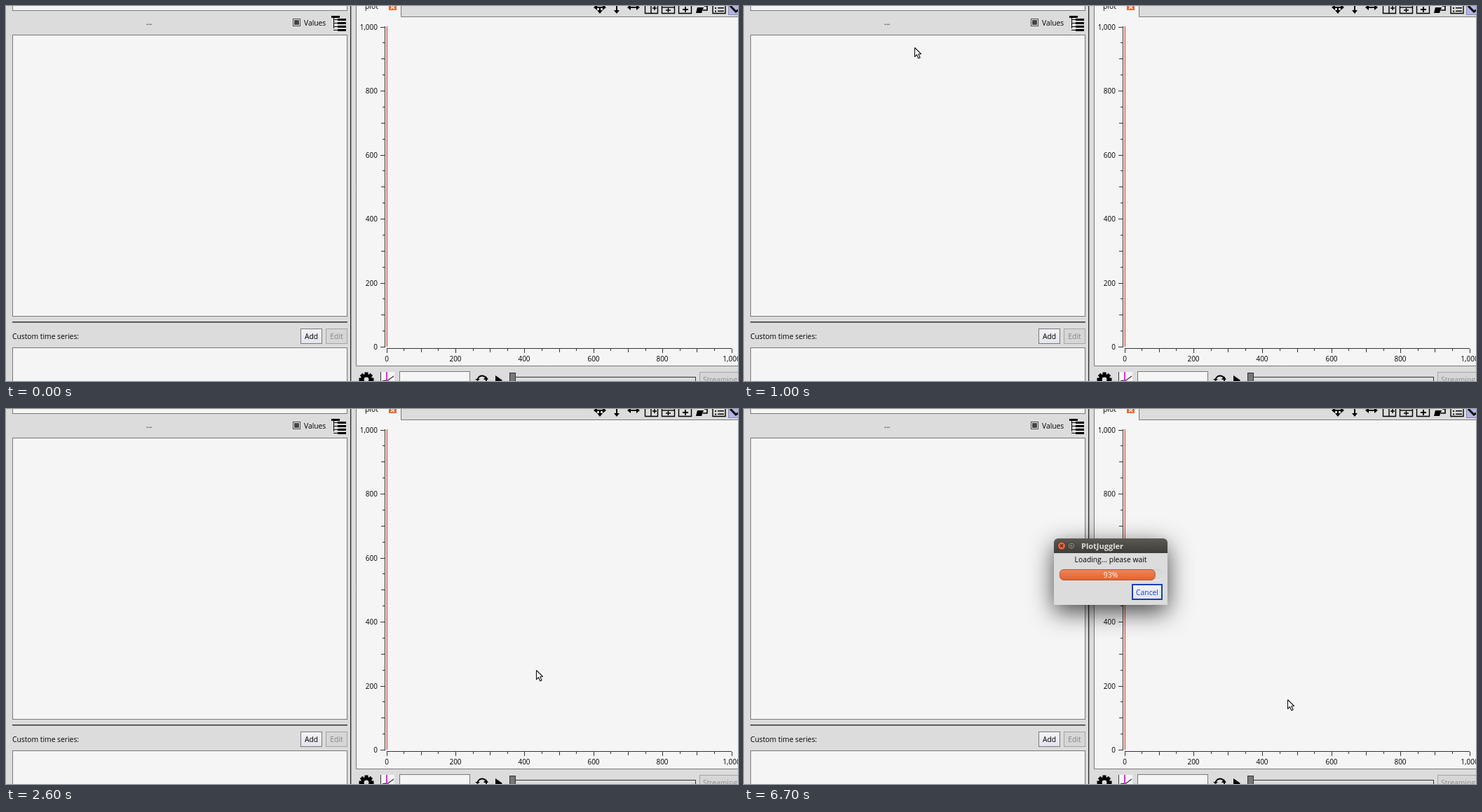
Write an HTML page with a canvas that moves like this. It is 1044 by 536 pixels and loops after 8 s.

```html
<!DOCTYPE html>
<html lang="en">
<head>
<meta charset="utf-8">
<title>Loading a data file</title>
<style>
  html, body { margin: 0; width: 100%; height: 100%; overflow: hidden; background: #dcdcdc; }
  canvas { display: block; }
</style>
</head>
<body>
<canvas id="stage" width="1044" height="536"></canvas>
<script>
const ctx = document.getElementById('stage').getContext('2d');
const LOOP = 8000, STEP = 100;
const FACE = '#dcdcdc', PAPER = '#f5f5f5', EDGE = '#787878', INK = '#000', DIM = '#8b8b8b';
const BLUE = '#1041b8', ORANGE = '#e8683c';
const USER = 'mabo';

// [time, x, y] of the pointer tip
const POINTER = [
  [800, 146, 4], [900, 196, 33], [1100, 290, 85], [1300, 385, 132], [1600, 453, 161],
  [1800, 453, 161], [1900, 490, 190], [2000, 600, 275], [2100, 715, 360],
  [2200, 752, 386], [2300, 756, 373], [3900, 756, 373], [4000, 776, 413],
  [4500, 776, 413], [4600, 775, 415]
];
// [time, percent]
const PROGRESS = [[4000, 10], [4600, 28], [5200, 49], [5700, 64], [6200, 79], [6700, 93]];

function fill(x, y, w, h, color) {
  ctx.fillStyle = color;
  ctx.fillRect(x, y, w, h);
}

function box(x, y, w, h, bg, edge = EDGE, lw = 1) {
  fill(x, y, w, h, bg);
  ctx.strokeStyle = edge;
  ctx.lineWidth = lw;
  ctx.strokeRect(x + lw / 2, y + lw / 2, w - lw, h - lw);
}

function line(points, color = INK, lw = 1) {
  ctx.strokeStyle = color;
  ctx.lineWidth = lw;
  ctx.beginPath();
  points.forEach(([x, y], i) => i ? ctx.lineTo(x, y) : ctx.moveTo(x, y));
  ctx.stroke();
}

function poly(points, color = '#000') {
  ctx.fillStyle = color;
  ctx.beginPath();
  points.forEach(([x, y]) => ctx.lineTo(x, y));
  ctx.fill();
}

function disc(x, y, r, color) {
  ctx.fillStyle = color;
  ctx.beginPath();
  ctx.arc(x, y, r, 0, Math.PI * 2);
  ctx.fill();
}

function text(s, x, y, { color = INK, size = 10.3, align = 'left', weight = 500 } = {}) {
  ctx.font = `${weight} ${size}px "Open Sans", "Noto Sans", sans-serif`;
  ctx.textAlign = align;
  ctx.fillStyle = color;
  ctx.fillText(s, x, y);
}

function vertical(y0, y1, ...colors) {
  const g = ctx.createLinearGradient(0, y0, 0, y1);
  colors.forEach((c, i) => g.addColorStop(i / (colors.length - 1), c));
  return g;
}

function clipped(x, y, w, h, draw) {
  ctx.save();
  ctx.beginPath();
  ctx.rect(x, y, w, h);
  ctx.clip();
  draw();
  ctx.restore();
}

function button(label, x, y, w, h, state = 'normal', key = false) {
  const off = state === 'off', down = state === 'down', hot = state === 'hot' || down;
  const bg = down ? '#7c7c7c' : off ? '#d6d6d6' : vertical(y, y + h, '#f4f4f8', '#e3e3ee');
  const color = hot ? BLUE : off ? '#858585' : INK;
  box(x, y, w, h, bg, hot ? BLUE : off ? '#a4a4a4' : EDGE, hot && !down ? 2 : 1);
  const mid = x + w / 2, base = y + h / 2 + 4;
  text(label, mid, base, { color, align: 'center' });
  if (key) {
    const left = mid - ctx.measureText(label).width / 2;
    fill(Math.round(left), Math.round(base) + 1, Math.ceil(ctx.measureText(label[0]).width), 1, color);
  }
}

function leftPanel() {
  box(9, -5, 478, 12, PAPER);
  text('...', 200, 27);
  box(409, 18, 11, 11, PAPER, '#444');
  fill(411, 20, 7, 7, '#444');
  text('Values', 425, 28);
  fill(464, 14, 12, 3, '#000');
  fill(467, 17, 1, 15, '#000');
  for (let y = 18; y < 34; y += 5) {
    fill(467, y + 1, 6, 1, '#000');
    fill(473, y, 12, 3, '#000');
  }
  box(9, 41, 478, 403, PAPER);
  fill(9, 451, 478, 1.5, '#333');
  text('Custom time series:', 9, 476);
  button('Add', 420, 461, 31, 22);
  button('Edit', 456, 461, 31, 22, 'off');
  box(9, 488, 478, 60, PAPER);
  fill(491, 0, 1, 536, '#222');
  fill(492, 0, 1, 536, '#aaa');
}

function arrow(x, y, dx, dy) {
  poly([[x + dx * 9, y + dy * 9], [x + dx * 4 - dy * 4, y + dy * 4 + dx * 4], [x + dx * 4 + dy * 4, y + dy * 4 - dx * 4]]);
  line([[x, y], [x + dx * 6, y + dy * 6]], '#000', 2);
}

function toolbar() {
  [[1, 0], [-1, 0], [0, 1]].forEach(d => arrow(847, 2, ...d));
  arrow(871, 2, 0, 1);
  line([[871, 0], [871, 3]], '#000', 2);
  arrow(895, 2, 1, 0);
  arrow(895, 2, -1, 0);
  for (const x of [911, 935, 959]) {
    line([[x + .5, 0], [x + .5, 10.5], [x + 18.5, 10.5], [x + 18.5, 0]], '#000', 1.4);
  }
  line([[920, 0], [920, 10]], '#000', 1.4);
  line([[922, 3], [928, 3]], '#000', 1.5);
  line([[925, 0], [925, 6]], '#000', 1.5);
  line([[936, 2], [953, 2]], '#000', 1.4);
  line([[941, 6], [948, 6]], '#000', 1.5);
  line([[944.5, 3], [944.5, 9]], '#000', 1.5);
  line([[965, 5], [973, 5]], '#000', 2);
  line([[969, 1], [969, 9]], '#000', 2);
  poly([[986, 2], [995, 2], [992, 10], [984, 10]]);
  line([[996, 0], [1000, 0], [1000, 6], [994, 6]], '#000', 1.6);
  line([[1008, 0], [1008, 10.5], [1026, 10.5], [1026, 0]], '#000', 1.4);
  for (const y of [2, 6.5]) {
    fill(1011, y, 2, 2, '#000');
    fill(1015, y, 9, 1.5, '#000');
  }
  fill(1030, 0, 14, 13, '#b3b3e4');
  line([[1030.5, 0], [1030.5, 12.5], [1044, 12.5]], '#8585b8');
  line([[1033, 0], [1041, 8], [1044, 6]], '#111', 3);
}

function plot() {
  fill(499, 0, 545, 515, PAPER);
  fill(563, 0, 481, 15, FACE);
  line([[499.5, 0], [499.5, 514.5], [1044, 514.5]], EDGE);
  line([[563.5, 0], [563.5, 15.5], [1044, 15.5]], EDGE);
  text('plot', 512, 4);
  fill(546, 0, 11, 6, ORANGE);
  line([[549, 0], [554, 4]], '#fff', 1.3);
  line([[554, 0], [549, 4]], '#fff', 1.3);
  toolbar();

  fill(540, 29, 1, 459, '#333');
  fill(543, 489, 492, 1, '#333');
  for (let i = 0; i <= 20; i++) {
    const len = i % 4 === 0 ? 6 : i % 2 === 0 ? 5 : 3;
    const x = Math.round(542.5 + i * 24.6), y = Math.round(487 - i * 22.875);
    fill(540 - len, y, len, 1, '#333');
    fill(x, 490, 1, len, '#333');
    if (i % 4 === 0) {
      const label = (i * 50).toLocaleString('en-US');
      text(label, 530, y + 4, { size: 10, align: 'right' });
      text(label, x, 508, { size: 10, align: 'center' });
    }
  }
  fill(542, 29, 1, 458, '#f0c8c4');
  fill(543, 29, 1, 458, '#cc4a42');
}

function playback() {
  ctx.save();
  ctx.translate(514, 534);
  for (let i = 0; i < 8; i++) {
    ctx.rotate(Math.PI / 4);
    fill(-2.5, -10.5, 5, 5, '#000');
  }
  disc(0, 0, 8, '#000');
  disc(0, 0, 3.4, FACE);
  ctx.restore();
  fill(534, 523, 20, 13, PAPER);
  line([[534.5, 523], [534.5, 536]], '#333');
  line([[537, 536], [545, 535], [553, 529]], '#333', 1.3);
  fill(542, 523, 2, 13, '#f020e8');
  box(561, 522, 101, 20, PAPER);
  ctx.strokeStyle = '#000';
  ctx.lineWidth = 2;
  ctx.beginPath();
  ctx.arc(679, 535, 6.5, Math.PI, Math.PI * 1.75);
  ctx.stroke();
  poly([[669, 533], [676, 533], [672.5, 536]]);
  poly([[681, 534], [688, 534], [684.5, 529]]);
  fill(684, 533, 2, 3, '#000');
  poly([[698, 528], [708, 535], [698, 542]]);
  box(722, 530, 262, 10, FACE, '#333');
  box(718, 524, 9, 14, '#777', '#333');
  box(989, 523, 80, 22, '#d6d6d6', '#a4a4a4');
  text('Streaming', 994, 538, { color: DIM });
}

function frame(x, y, w, h, title, size) {
  ctx.save();
  ctx.shadowColor = 'rgba(0,0,0,.72)';
  ctx.shadowBlur = 34;
  ctx.shadowOffsetY = 10;
  ctx.fillStyle = FACE;
  ctx.beginPath();
  ctx.roundRect(x, y, w, h, [6, 6, 0, 0]);
  ctx.fill();
  ctx.restore();
  ctx.fillStyle = vertical(y, y + 21, '#5b5953', '#3e3d39');
  ctx.beginPath();
  ctx.roundRect(x, y, w, 21, [6, 6, 0, 0]);
  ctx.fill();
  const cx = x + 11, cy = y + 10.5;
  disc(cx, cy, 6, '#33322e');
  disc(cx, cy, 5.2, '#e9653d');
  line([[cx - 2, cy - 2], [cx + 2, cy + 2]], '#54291b', 1.2);
  line([[cx + 2, cy - 2], [cx - 2, cy + 2]], '#54291b', 1.2);
  disc(cx + 14, cy, 5.7, '#35342f');
  disc(cx + 14, cy, 4.8, '#74726b');
  ctx.strokeStyle = '#45443f';
  ctx.lineWidth = 1;
  ctx.strokeRect(cx + 12, cy - 2, 4, 4);
  text(title, x + 39, y + 15, { color: '#e2dfd7', weight: 700, size });
}

function folder(x, y, s = 1) {
  fill(x, y, 6 * s, 4 * s, '#a9502b');
  fill(x, y + 1.5 * s, 13 * s, 9.5 * s, '#b0552c');
  fill(x + 1.5 * s, y + 2.5 * s, 10 * s, 1.5 * s, '#e8c4a8');
  fill(x + .5, y + 4 * s, 13 * s - 1, 7 * s - .5, vertical(y + 4 * s, y + 11 * s, '#f3a873', '#d85c28'));
}

function page(x, y, tint) {
  box(x, y, 10, 12, tint, '#b5b0ab');
  for (let i = 3; i < 10; i += 2) fill(x + 2, y + i, i === 3 ? 3 : 6, 1, '#b9b4b0');
}

function dropMark(x, y) {
  poly([[x - 3, y - 2], [x + 3, y - 2], [x, y + 2.5]], '#444');
}

function navIcons() {
  line([[673, 88], [667.5, 93], [673, 98]], '#a0a0a0', 2);
  line([[686, 88], [691.5, 93], [686, 98]], '#a0a0a0', 2);
  line([[702, 96], [707.5, 90.5], [713, 96]], '#9c4a22', 3.6);
  line([[702, 96], [707.5, 90.5], [713, 96]], '#ee8146', 2);
  folder(721, 87);
  line([[728, 94.5], [733, 94.5]], '#f4ead0', 1.5);
  line([[730.5, 92], [730.5, 97]], '#f4ead0', 1.5);
  for (const x of [738, 758]) {
    ctx.strokeStyle = '#222';
    ctx.lineWidth = 1.2;
    ctx.beginPath();
    ctx.roundRect(x + .5, 86.5, 12.5, 12.5, 2);
    ctx.fillStyle = PAPER;
    ctx.fill();
    ctx.stroke();
  }
  for (const x of [741, 746]) for (const y of [89, 94]) fill(x, y, 3, 3, '#222');
  for (const y of [89, 92, 95]) fill(761, y, 7, 1.4, '#222');
}

function fileList(picked) {
  box(276, 107, 87, 243, PAPER);
  box(280, 109, 17, 14, '#444', '#777');
  fill(282, 111, 13, 10, vertical(111, 121, '#78308a', '#c873bd'));
  fill(283, 123, 12, 2, '#999');
  text('Computer', 303, 122);
  folder(279, 132, 1.45);
  text(USER, 303, 143);

  box(362, 107, 409, 243, PAPER);
  fill(363, 108, 407, 17, vertical(108, 125, '#f2f2f2', '#e6e6e6'));
  fill(363, 125, 407, 1, '#c4c4c4');
  for (const x of [613, 669, 729]) fill(x, 108, 1, 17, '#b8b8b8');
  const head = { color: '#3c3c3c' };
  text('Name', 380, 120, head);
  dropMark(605, 116);
  text('Size', 616, 120, head);
  text('Type', 673, 120, head);
  if (picked) fill(363, 162, 407, 19, '#145f9c');
  clipped(363, 108, 407, 232, () => {
    text('Date Modified', 733, 120, head);
    const rows = [['hdl_dataset', 'Folder', '20/3/25'], ['KITTI', 'Folder', '20/5/29'], ['test.bag', 'bag File', '18/11/30']];
    rows.forEach(([name, type, date], i) => {
      const y = 138 + i * 19, opt = { color: picked && i === 2 ? '#fff' : INK };
      if (i < 2) folder(366, y - 9);
      else page(367, 166, picked ? '#f0c9b8' : '#ececec');
      text(name, 384, y, opt);
      text(type, 673, y, opt);
      text(date, 733, y, opt);
    });
    text('1.62 GB', 668, 172, { color: picked ? '#fff' : INK, align: 'right' });
  });

  fill(363, 340, 407, 9, '#d2d2d2');
  box(372, 340, 337, 9, '#e5e5e5', '#aaa');
  box(363, 340, 9, 9, '#eaeaea', '#bbb');
  box(761, 340, 9, 9, '#eaeaea', '#bbb');
  poly([[369, 342], [369, 347], [365, 344.5]], '#444');
  poly([[764, 342], [764, 347], [768, 344.5]], '#444');
}

function openDialog(t) {
  const picked = t >= 1700;
  frame(268, 55, 510, 356, 'Open', 10.4);
  text('Look in:', 276, 97);
  box(341, 83, 318, 19, PAPER);
  folder(345, 87);
  text(`/home/${USER}/Dataset`, 363, 97);
  fill(646, 84, 12, 17, '#ededed');
  dropMark(652, 93.5);
  navIcons();
  fileList(picked);
  text('File name:', 276, 370);
  fill(298, 371, 6, 1, INK);
  box(341, 358, 382, 15, PAPER);
  if (picked) text('test.bag', 345, 370);
  text('Files of type:', 276, 397);
  box(341, 383, 381, 18, PAPER);
  text('*.bag *.csv *.ulg', 346, 396);
  fill(710, 384, 11, 16, '#ededed');
  dropMark(716, 393.5);
  const state = !picked ? 'off' : t >= 2500 ? 'down' : t >= 2300 ? 'hot' : 'normal';
  button('Open', 727, 355, 44, 22, state, true);
  button('Cancel', 727, 382, 44, 22, t >= 2200 && t < 2300 ? 'hot' : 'normal', true);
}

function loadingDialog(t) {
  const percent = PROGRESS.filter(([at]) => at <= t).pop()[1];
  const end = 450 + 1.47 * percent, label = percent + '%';
  frame(442, 185, 162, 95, 'PlotJuggler', 11);
  text('Loading... please wait', 523, 219, { align: 'center' });

  const bar = vertical(229, 245, '#f0875a', '#e0622f');
  ctx.lineWidth = 1;
  ctx.beginPath();
  ctx.roundRect(450.5, 229.5, 146, 15, 6);
  ctx.fillStyle = '#dadada';
  ctx.fill();
  ctx.strokeStyle = vertical(229, 245, '#c6c6c6', '#f4f4f4');
  ctx.stroke();
  text(label, 523, 241, { color: '#484848', align: 'center' });
  ctx.beginPath();
  ctx.roundRect(450.5, 229.5, end - 451, 15, 5.5);
  ctx.fillStyle = bar;
  ctx.fill();
  ctx.strokeStyle = '#b75a36';
  ctx.stroke();
  clipped(450, 229, end - 450, 16, () => {
    text(label, 523, 241, { color: '#fff', align: 'center' });
  });
  button('Cancel', 553, 250, 44, 23, 'hot');
}

function pointerAt(t) {
  const next = POINTER.findIndex(([at]) => at > t);
  if (next < 0) return POINTER[POINTER.length - 1].slice(1);
  const [t0, x0, y0] = POINTER[next - 1], [t1, x1, y1] = POINTER[next];
  const k = (t - t0) / (t1 - t0);
  return [x0 + (x1 - x0) * k, y0 + (y1 - y0) * k];
}

function pointer(t) {
  if (t < POINTER[0][0]) return;
  const [x, y] = pointerAt(t);
  const shape = [[0, 0], [0, 13], [3, 10.2], [5.3, 15.3], [7.6, 14.2], [5.3, 9.3], [9, 9]];
  ctx.save();
  ctx.translate(Math.round(x) + .5, Math.round(y) + .5);
  poly(shape, '#fff');
  ctx.lineJoin = 'round';
  line([...shape, shape[0]], '#111', 1.1);
  ctx.restore();
}

function draw(now) {
  const t = Math.floor((now % LOOP) / STEP) * STEP;
  fill(0, 0, 1044, 536, FACE);
  leftPanel();
  plot();
  playback();
  if (t >= 1200 && t < 2600) openDialog(t);
  if (t >= 4000) loadingDialog(t);
  pointer(t);
}

const start = performance.now();
function tick() {
  draw(performance.now() - start);
  requestAnimationFrame(tick);
}
tick();
</script>
</body>
</html>
```
